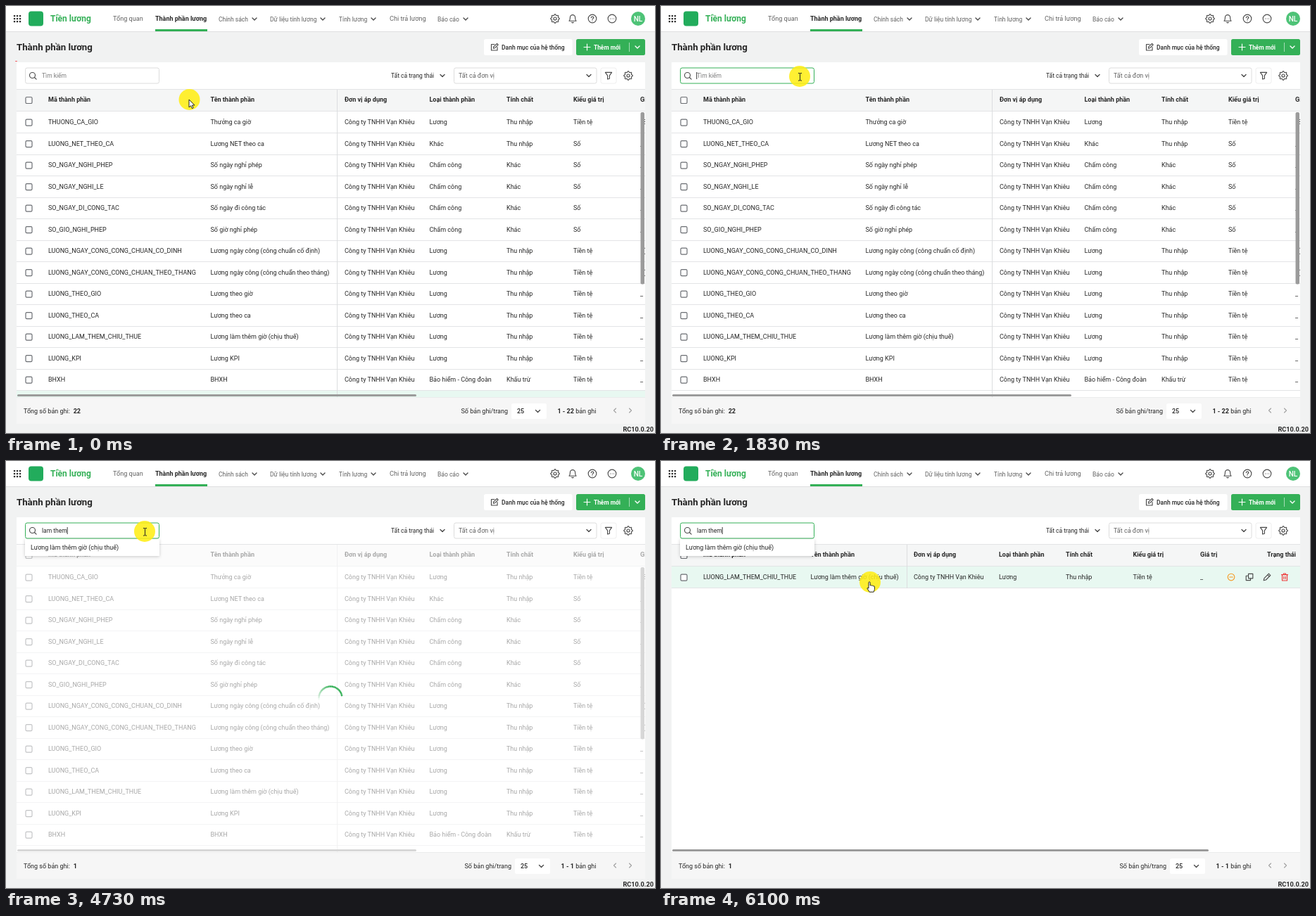
These frames come from a looping animation (922x607 px, 7.26 s). An HTML page:

```html
<!DOCTYPE html>
<html lang="vi">
<head>
<meta charset="utf-8">
<title>Thành phần lương</title>
<style>
html, body { margin: 0; width: 100%; height: 100%; overflow: hidden; background: #f1f2f2; }
svg { display: block; width: 922px; height: 607px; font-family: Roboto, "Noto Sans", sans-serif; }
text { fill: #262626; white-space: pre; }
.b { font-weight: 700; }
.m { font-weight: 500; }
.nav { fill: #606060; }
.hint { fill: #7c7c7c; }
.green { fill: #34b057; }
.white { fill: #fff; }
.ico { fill: none; stroke: #4a4a4a; stroke-width: 1.15; stroke-linecap: round; stroke-linejoin: round; }
.crisp { shape-rendering: crispEdges; }
</style>
</head>
<body>
<svg id="stage" viewBox="0 0 922 607" xmlns="http://www.w3.org/2000/svg"></svg>
<script>
const LOOP = 7260;
const GREEN = '#34b057', LINE = '#e3e4e6', HOVER = '#e8f8f1';
const TOP = 165, PITCH = 30.5;

const txt = (x, cy, s, size = 9, cls = '', more = '') =>
  `<text x="${x}" y="${(cy + size * 0.36).toFixed(2)}" font-size="${size}" class="${cls}" ${more}>${s}</text>`;
const box = (x, y, w, h, fill, more = '') =>
  `<rect x="${x}" y="${y}" width="${w}" height="${h}" fill="${fill}" ${more}/>`;
const icon = (x, y, d, more = '') =>
  `<path class="ico" transform="translate(${x} ${y})" d="${d}" ${more}/>`;
const ring = r => `M${r} 0A${r} ${r} 0 1 1 ${-r} 0A${r} ${r} 0 1 1 ${r} 0Z`;
const chevron = (x, y, more = '') => icon(x, y, 'M-3 -1.5L0 1.5L3 -1.5', `style="stroke-width:1.4" ${more}`);
const group = (id, body, more = '') => `<g id="${id}" ${more}>${body}</g>`;

function gear(x, y) {
  let d = '';
  for (let i = 0; i < 32; i++) {
    const a = (i - 0.5) * Math.PI / 16, r = i % 4 < 2 ? 6.2 : 4.9;
    d += `${i ? 'L' : 'M'}${(r * Math.cos(a)).toFixed(2)} ${(r * Math.sin(a)).toFixed(2)}`;
  }
  return icon(x, y, d + 'Z' + ring(2));
}

const check = y => box(28, y - 4.5, 9, 9, '#fff', 'rx="1.6" stroke="#6a6d72" stroke-width="1.2"');

function topBar() {
  let s = box(0, 0, 922, 36, '#fff') + box(0, 36, 922, 1, '#dedfe0', 'class="crisp"');
  for (let i = 0; i < 9; i++) s += box(10.9 + i % 3 * 4, 12.9 + (i / 3 | 0) * 4, 2.3, 2.3, '#2c2c2c', 'rx=".5"');
  s += box(32, 7.5, 21, 21, '#22ac5c', 'rx="4"') + txt(63, 17.3, 'Tiền lương', 12, 'b green');
  s += txt(152, 18, 'Tổng quan', 9.1, 'nav') + txt(212, 18, 'Thành phần lương', 9, 'b');
  s += txt(545, 18, 'Chi trả lương', 9.1, 'nav') + box(212, 33, 74, 3, GREEN);
  const menus = [[302, 'Chính sách', 353], [375, 'Dữ liệu tính lương', 450], [473, 'Tính lương', 522], [613, 'Báo cáo', 653]];
  for (const [x, name, cx] of menus) s += txt(x, 18.6, name, 8.5, 'nav') + chevron(cx, 18.4);
  s += gear(780, 18);
  s += icon(805, 18, 'M-5 3.2H5C3.4 1.6 3.8 0 3.6 -1.8A3.6 3.6 0 0 0 -3.6 -1.8C-3.8 0 -3.4 1.6 -5 3.2ZM-1.3 5.3Q0 6.4 1.3 5.3');
  s += icon(833, 18, ring(5.8) + 'M-1.7 -1.4Q-1.5 -3 0 -3Q1.8 -2.9 1.8 -1.4C1.8 -.2 0 0 0 1.2M0 3V3.1');
  s += icon(861, 18, ring(5.8) + 'M-2.6 0H-2.5M0 0H.1M2.6 0H2.7');
  return s + `<circle cx="898" cy="18" r="10" fill="#4ec377"/>` + txt(898, 18, 'NL', 10, 'm white', 'text-anchor="middle"');
}

function titleBar() {
  return txt(15, 58, 'Thành phần lương', 13.25, 'b')
    + box(679, 47, 125.5, 23, '#fff', 'rx="2.5"')
    + icon(694, 58.5, 'M0 -4H-4.5V4.5H4V0M-1.6 1.6L-1.2 -.6L3.6 -5L5.2 -3.4L.6 1.2Z') + txt(704, 58.5, 'Danh mục của hệ thống', 8.5, 'm')
    + box(810, 47, 98, 23, GREEN, 'rx="2.5"') + box(885, 52, 1, 13, '#a5dcb5')
    + icon(825.5, 58.5, 'M-4.5 0H4.5M0 -4.5V4.5', 'style="stroke:#fff"')
    + txt(835, 58.5, 'Thêm mới', 8.4, 'b white') + chevron(897, 58.5, 'stroke="#fff"').replace('stroke-width:1.4', 'stroke-width:1.4;stroke:#fff');
}

function toolBar() {
  return box(27.5, 88, 190, 22, '#fff', 'id="field" rx="2.5"')
    + icon(37.5, 98.5, ring(4) + 'M3 3L5.6 5.6') + txt(51, 99, '', 8.5, 'hint', 'id="query"')
    + box(50.3, 94, 0.9, 10, '#222', 'id="caret"')
    + txt(547, 99, 'Tất cả trạng thái', 8.5) + chevron(620, 99)
    + box(636.5, 88, 202.5, 22, '#fff', 'rx="2.5" stroke="#dcdcdc"') + txt(643, 98.6, 'Tất cả đơn vị', 9, 'nav') + chevron(828, 99)
    + box(845, 88, 22, 22, '#fff', 'rx="2.5" stroke="#eeeeee"')
    + icon(856, 99, 'M-4.6 -4.6H4.6L1.4 -.2V4.2L-1.4 5V-.2Z') + gear(884, 99);
}

// Column starts: code, name, unit, type, nature, kind, value, status
const HEADS = ['Mã thành phần', 'Tên thành phần', 'Đơn vị áp dụng', 'Loại thành phần', 'Tính chất', 'Kiểu giá trị', 'Giá trị', 'Trạng thái'];
const UNIT = 'Công ty TNHH Vạn Khiêu';
const PAY = ['Lương', 'Thu nhập', 'Tiền tệ'], DAYS = ['Chấm công', 'Khác', 'Số'];
const ROWS = [
  ['THUONG_CA_GIO', 'Thưởng ca giờ', PAY],
  ['LUONG_NET_THEO_CA', 'Lương NET theo ca', ['Khác', 'Thu nhập', 'Số']],
  ['SO_NGAY_NGHI_PHEP', 'Số ngày nghỉ phép', DAYS],
  ['SO_NGAY_NGHI_LE', 'Số ngày nghỉ lễ', DAYS],
  ['SO_NGAY_DI_CONG_TAC', 'Số ngày đi công tác', DAYS],
  ['SO_GIO_NGHI_PHEP', 'Số giờ nghỉ phép', DAYS],
  ['LUONG_NGAY_CONG_CONG_CHUAN_CO_DINH', 'Lương ngày công (công chuẩn cố định)', PAY],
  ['LUONG_NGAY_CONG_CONG_CHUAN_THEO_THANG', 'Lương ngày công (công chuẩn theo tháng)', PAY],
  ['LUONG_THEO_GIO', 'Lương theo giờ', PAY],
  ['LUONG_THEO_CA', 'Lương theo ca', PAY],
  ['LUONG_LAM_THEM_CHIU_THUE', 'Lương làm thêm giờ (chịu thuế)', PAY],
  ['LUONG_KPI', 'Lương KPI', PAY],
  ['BHXH', 'BHXH', ['Bảo hiểm - Công đoàn', 'Khấu trừ', 'Tiền tệ']]
];
const FORMULAS = { 0: 'S', 6: '(', 7: '(' };

function table(cols, rows, split, bar, hover) {
  let s = box(15, 119, 893, 30, '#f5f6f6') + box(15, 118, 893, 1, LINE, 'class="crisp"') + box(15, 149, 893, 1, LINE, 'class="crisp"');
  s += hover + check(134);
  cols.forEach((x, i) => s += txt(x, 133, HEADS[i], 9, 'b'));
  rows.forEach(([code, name, rest], i) => {
    const y = TOP + i * PITCH;
    s += check(y + 0.7) + box(15, Math.round(y + 15), 893, 1, LINE, 'class="crisp"');
    [code, name, UNIT, ...rest].forEach((v, c) => s += txt(cols[c], y, v));
    const formula = cols.length < 8 && FORMULAS[i];
    s += txt(cols[6] + (formula ? 4 : 0), y, formula || '_');
  });
  const end = rows.length > 1 ? 556 : 181;
  s += box(split, 119, 1, end - 119, '#dcdddf', 'class="crisp"');
  return s + box(16, 552, bar, 3, '#9b9b9b', 'rx="1.5"');
}

function allRows() {
  return table([60, 290.5, 481, 601.5, 711, 806, 901], ROWS, 470, 567, box(15, 547, 893, 9, HOVER, 'id="lastHover"'))
    + box(901.5, 151, 5.5, 244.5, '#9b9b9b', 'rx="2"');
}

function foundRow() {
  const status = `<circle cx="863.5" cy="165.3" r="2.5" fill="${GREEN}"/>` + txt(871, 165, 'Đang theo dõi', 9, 'green');
  const actions = icon(810, 165, ring(4.8) + 'M-2.3 0H2.3', 'style="stroke:#f59a23"')
    + icon(836, 165, 'M-1.5 -4.6H4.8V1.8H-1.5ZM-1.5 -1.8H-4.8V4.6H1.5V1.8')
    + icon(861, 165, 'M-4.8 4.8L-4 1.6L2.4 -4.8L4.8 -2.4L-1.6 4ZM.8 -3.2L3.2 -.8')
    + icon(886, 165, 'M-4.5 -3.4H4.5M-1.5 -3.6V-5H1.5V-3.6M-3.5 -3.2V5H3.5V-3.2M-1.2 -.8V2.6M1.2 -.8V2.6', 'style="stroke:#ee3b3b"');
  return table([60, 212.5, 359, 480, 575, 670.5, 766, 861], [ROWS[10]], 349, 762, box(15, 150, 893, 30, HOVER, 'id="rowHover"'))
    + group('status', status) + group('actions', actions);
}

function footer() {
  const pager = txt(713, 576, 'Số bản ghi/trang', 9, '', 'text-anchor="end"') + box(718, 565, 50, 22, '#fff', 'rx="2.5"')
    + txt(726, 576, '25', 9, 'm') + chevron(755.5, 576);
  return box(15, 556, 893, 38, '#f6f6f6') + box(15, 556, 893, 1, '#ebecec', 'class="crisp"')
    + txt(25, 575.5, 'Tổng số bản ghi:') + txt(95.7, 575.5, '22', 9, 'b', 'id="total"') + group('pager', pager)
    + txt(838.5, 575.5, '<tspan class="b" id="range"></tspan> bản ghi', 9, '', 'text-anchor="end"')
    + icon(865, 575, 'M1.5 -3L-1.5 0L1.5 3', 'style="stroke:#a0a0a0"') + icon(887, 575, 'M-1.5 -3L1.5 0L-1.5 3', 'style="stroke:#a0a0a0"')
    + txt(920, 602, 'RC10.0.20', 9.2, 'b', 'text-anchor="end"');
}

function spinner() {
  const R = 16.5, N = 36;
  let s = '';
  for (let i = 0; i < N; i++) {
    const p = a => `${(R * Math.cos(a)).toFixed(2)} ${(R * Math.sin(a)).toFixed(2)}`;
    const a = -i * Math.PI / N, b = a - Math.PI / N * 1.1;
    s += `<path d="M${p(a)}A${R} ${R} 0 0 0 ${p(b)}" fill="none" stroke="${GREEN}" stroke-width="2.4" opacity="${(Math.min(1, 1.7 * (1 - i / N))).toFixed(2)}"/>`;
  }
  return group('loader', `<g transform="translate(461 337)">${group('spin', s)}</g>`);
}

function pointer() {
  const ink = 'fill="#fff" stroke="#111" stroke-width=".9" stroke-linejoin="round"';
  return group('mouse', '<circle r="15" fill="#ffee14" opacity=".87"/>'
    + `<path id="arrow" ${ink} d="M-.5 0V11L2.1 8.7L3.8 12.6L5.6 11.8L3.9 8H7.4Z"/>`
    + '<path id="beam" fill="none" stroke="#222" d="M-2 -4.5H0L.5 -4L1 -4.5H3M.5 -4V5.5M-2 6H0L.5 5.5L1 6H3"/>'
    + `<path id="hand" ${ink} d="M-2 .5Q-1 -1.2 .2 .5V5Q1.4 4 2.4 5.3Q3.6 4.4 4.6 5.8Q6.2 5.2 6.4 7V10.5L5.2 14.2H-.8L-4.2 9Q-4 7.4 -2 9Z"/>`);
}

const stage = document.getElementById('stage');
stage.innerHTML = `<defs><clipPath id="card"><rect x="15" y="80" width="893" height="476"/></clipPath>
  <clipPath id="right"><rect x="471" y="119" width="437" height="437"/></clipPath></defs>`
  + topBar() + titleBar() + box(15, 80, 893, 476, '#fff')
  + group('all', allRows(), 'clip-path="url(#card)"') + group('found', foundRow(), 'clip-path="url(#card)"')
  + box(471, 119, 437, 30, '#fff', 'id="headVeil"') + '<path id="veil" fill="#fff" d="M15 119H471V149H908V556H15Z"/>'
  + spinner() + footer() + toolBar()
  + group('list', box(27, 111, 191, 24, '#fff', 'style="filter:drop-shadow(0 1px 2px #0003)"') + txt(35, 122.6, ROWS[10][1], 9, '', 'id="item"'))
  + '<path id="frame" d="M14.5 78V118.5H233V78H14.5" fill="none" stroke="#f8040c" stroke-width="2.6" pathLength="1" stroke-dasharray="1 2"/>'
  + pointer();

const el = {};
stage.querySelectorAll('[id]').forEach(n => el[n.id] = n);
const show = (n, on) => n.style.display = on ? '' : 'none';
const set = (n, key, v) => n.setAttribute(key, v);
const ramp = (t, a, b) => Math.min(1, Math.max(0, (t - a) / (b - a)));

const KEYS = [[2260, 'l'], [2330, 'la'], [2400, 'lam'], [2700, 'lam '], [2760, 'lam t'], [2820, 'lam th'], [2870, 'lam the'], [2930, 'lam them']];
const PATH = [[1200, 260.5, 133], [1360, 312, 142], [1560, 262, 122], [1800, 197, 100]];

function mouseAt(t) {
  if (t >= 5660) {
    const k = (1 - Math.cos(Math.PI * ramp(t, 5585, 6100))) / 2;
    return [197 + 100 * k, 100 + 72 * k];
  }
  let [, x, y] = PATH[0];
  for (let i = 1; i < PATH.length; i++) {
    const [a, x0, y0] = PATH[i - 1], [b, x1, y1] = PATH[i], k = ramp(t, a, b);
    if (k > 0) { x = x0 + (x1 - x0) * k; y = y0 + (y1 - y0) * k; }
  }
  return [x, y];
}

function render(t) {
  // Marker frame
  set(el.frame, 'stroke-dashoffset', 1 - ramp(t, 0, 765));
  set(el.frame, 'opacity', 1 - ramp(t, 1200, 1290));
  show(el.lastHover, t < 700);

  // Pointer
  const [x, y] = mouseAt(t);
  const inField = x < 218 && y < 111, onName = t > 5600 && y > 158;
  set(el.mouse, 'transform', `translate(${x.toFixed(2)} ${y.toFixed(2)})`);
  show(el.beam, inField);
  show(el.hand, onName);
  show(el.arrow, !inField && !onName);

  // Search field
  let typed = '';
  for (const [at, s] of KEYS) if (t >= at) typed = s;
  const focus = t >= 1800;
  set(el.field, 'stroke', focus ? GREEN : '#dcdcdc');
  el.query.textContent = typed || 'Tìm kiếm';
  set(el.query, 'class', typed ? '' : 'hint');
  show(el.caret, focus);
  set(el.caret, 'x', typed ? 51 + el.query.getComputedTextLength() : 50.3);
  show(el.list, t >= 2930);
  show(el.item, t >= 3130);

  // Loading and result
  const done = t >= 4900, out = 1 - ramp(t, 4900, 5130);
  show(el.all, !done);
  show(el.found, done);
  set(el.headVeil, 'opacity', 0.6 * ramp(t, 3790, 3860) * out);
  set(el.veil, 'opacity', 0.6 * ramp(t, 3930, 4100) * out);
  show(el.loader, t >= 3830 && !done);
  set(el.loader, 'clip-path', t < 3930 ? 'url(#right)' : 'none');
  set(el.spin, 'transform', `rotate(${((t - 4730) * 0.36 - 10).toFixed(1)})`);

  const one = t >= 4650;
  el.total.textContent = one ? '1' : '22';
  el.range.textContent = one ? '1 - 1' : '1 - 22';
  set(el.pager, 'transform', `translate(${one ? 5 : 0} 0)`);

  const hover = done && y >= 150;
  show(el.rowHover, hover);
  show(el.actions, hover);
  show(el.status, !hover);
}

const start = performance.now();
function tick() {
  render((performance.now() - start) % LOOP);
  requestAnimationFrame(tick);
}
tick();
</script>
</body>
</html>
```
